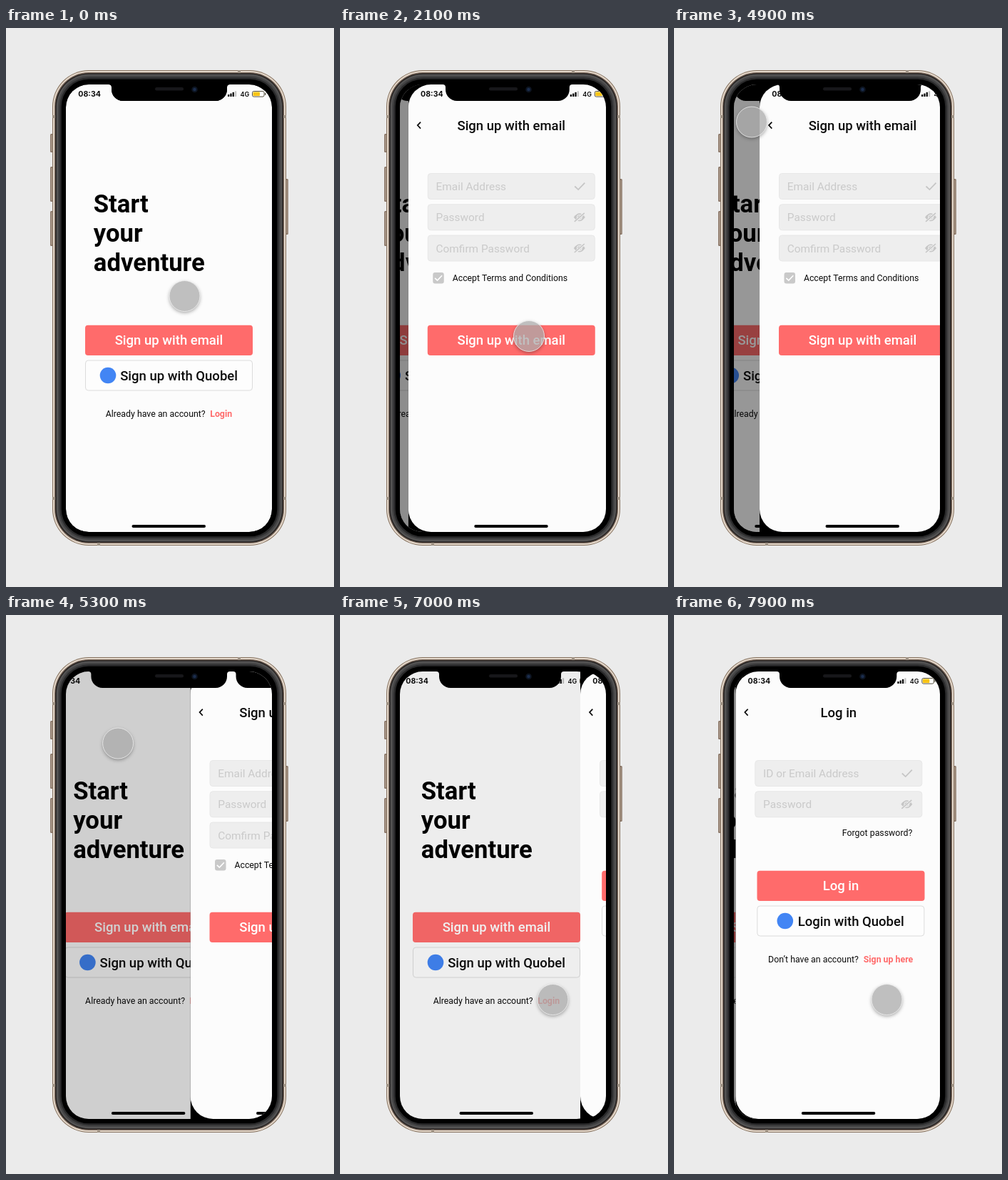
An HTML page with a canvas for the animation above (8 s loop, 460 px wide and 782 px high).

```html
<!DOCTYPE html>
<html lang="en">
<head>
<meta charset="utf-8">
<title>Sign-up flow</title>
<style>
  html, body { margin: 0; width: 100%; height: 100%; overflow: hidden; background: #ebebeb; }
  canvas { display: block; width: 460px; height: 782px; }
</style>
</head>
<body>
<canvas id="stage"></canvas>
<script>
const canvas = document.getElementById('stage');
const ctx = canvas.getContext('2d');
const ratio = window.devicePixelRatio || 1;
canvas.width = 460 * ratio;
canvas.height = 782 * ratio;

const LOOP = 8000, STEP = 100, SLIDE = 1310;
const SCREEN = { x: 84, y: 79, w: 289, h: 626, r: 32 };
const MID = SCREEN.x + SCREEN.w / 2;
const CORAL = '#ff6b6b', INK = '#0c0c0c', HINT = '#cacaca', PAPER = '#fcfcfc';

const clamp = v => Math.min(1, Math.max(0, v));
const progress = (t, start, length) => clamp((t - start) / length);
const easeInOut = u => u < 0.5 ? 2 * u * u : 1 - 2 * (1 - u) ** 2;
const easeOut = u => 1 - (1 - u) ** 2;

function box(x, y, w, h, r, fill, stroke) {
  ctx.beginPath();
  ctx.roundRect(x, y, w, h, r);
  if (fill) { ctx.fillStyle = fill; ctx.fill(); }
  if (stroke) { ctx.strokeStyle = stroke; ctx.lineWidth = 1; ctx.stroke(); }
}

function disc(x, y, r, fill) {
  ctx.beginPath();
  ctx.arc(x, y, r, 0, Math.PI * 2);
  ctx.fillStyle = fill;
  ctx.fill();
}

function line(color, width, ...points) {
  ctx.beginPath();
  points.forEach(([x, y]) => ctx.lineTo(x, y));
  ctx.strokeStyle = color;
  ctx.lineWidth = width;
  ctx.stroke();
}

function text(str, x, y, size, { weight = 400, color = INK, align = 'left', family = 'Roboto' } = {}) {
  ctx.font = `${weight} ${size}px ${family}, sans-serif`;
  ctx.textAlign = align;
  ctx.fillStyle = color;
  ctx.fillText(str, x, y);
}

// Interface parts

function title(str) {
  line(INK, 1.7, [101.3, 131.6], [97, 136.1], [101.3, 140.6]);
  text(str, MID, 143, 18.5, { weight: 500, align: 'center' });
}

function primaryButton(str, x, y) {
  box(x, y, 235, 42.3, 4, CORAL);
  text(str, x + 117.5, y + 27.3, 18.5, { weight: 500, color: '#fff', align: 'center' });
}

function partnerButton(str, x, y, iconX, textX) {
  box(x + 0.5, y + 0.5, 234, 42, 4, '#fdfdfd', '#dcdcdc');
  disc(iconX, y + 21.5, 11.3, '#4285f4');
  text(str, textX, y + 28, 18.5, { weight: 500 });
}

function tick(x, y, size, color, width) {
  line(color, width, [x - size, y], [x - size * 0.3, y + size * 0.65], [x + size, y - size * 0.7]);
}

function hiddenEye(x, y) {
  ctx.beginPath();
  ctx.moveTo(x - 8, y);
  ctx.quadraticCurveTo(x, y - 11, x + 8, y);
  ctx.quadraticCurveTo(x, y + 11, x - 8, y);
  ctx.fillStyle = '#c6c6c6';
  ctx.fill();
  ctx.beginPath();
  ctx.arc(x, y, 3.3, 0, Math.PI * 2);
  ctx.strokeStyle = '#eee';
  ctx.lineWidth = 1.2;
  ctx.stroke();
  line('#eee', 3.6, [x - 6, y + 6], [x + 7, y - 6]);
  line('#c6c6c6', 1.6, [x - 7, y + 6], [x + 7, y - 6]);
}

function field(hint, y, secret) {
  box(111.5, y + 0.5, 234, 36, 4, '#eee', '#e7e7e7');
  text(hint, 122.8, y + 24, 15.4, { color: HINT });
  if (secret) hiddenEye(324, y + 18.5);
  else tick(324.5, y + 18.5, 7, '#c6c6c6', 1.8);
}

function prompt(question, x, action, actionX, y) {
  text(question, x, y, 12.35);
  text(action, actionX, y, 12.35, { weight: 700, color: CORAL });
}

function statusBar() {
  text('08:34', 101.3, 95.6, 10.6, { weight: 700, family: 'Inter' });
  for (let i = 0; i < 4; i++) {
    const h = 3 + i * 1.6;
    box(311 + i * 3.3, 96 - h, 2.3, h, 0.6, i < 3 ? INK : '#c4c4c4');
  }
  text('4G', 328.4, 96.3, 9, { weight: 600, family: 'Inter' });
  box(345.5, 88.5, 16.5, 7.6, 2, '#fff', '#55503f');
  box(346.5, 89.5, 9.5, 5.6, 1, '#fac515');
  box(363, 90.8, 1.3, 3, 0.6, '#55503f');
}

function notch() {
  ctx.beginPath();
  ctx.moveTo(144, 78);
  ctx.lineTo(144, 79);
  ctx.arcTo(148, 79, 148, 83, 4);
  ctx.arcTo(148, 102, 165, 102, 16);
  ctx.arcTo(310, 102, 310, 85, 16);
  ctx.arcTo(310, 79, 314, 79, 4);
  ctx.lineTo(314, 78);
  ctx.fillStyle = '#000';
  ctx.fill();
}

// Pages

function homePage() {
  ['Start', 'your', 'adventure'].forEach((word, i) =>
    text(word, 122.8, 258 + i * 40.9, 34.7, { weight: 700, color: '#000' }));
  primaryButton('Sign up with email', 111, 415.7);
  partnerButton('Sign up with Quobel', 111, 464.5, 143, 160.2);
  prompt('Already have an account?', 139.7, 'Login', 286.2, 544);
}

function signUpPage() {
  title('Sign up with email');
  field('Email Address', 203);
  field('Password', 246.3, true);
  field('Comfirm Password', 289.5, true);
  box(118.5, 342, 15.5, 15.5, 3, '#c9c9c9');
  tick(126.3, 349.8, 5, '#fff', 1.6);
  text('Accept Terms and Conditions', 145.9, 354, 12.3);
  primaryButton('Sign up with email', 111, 415.7);
}

function loginPage() {
  title('Log in');
  field('ID or Email Address', 203);
  field('Password', 246.3, true);
  text('Forgot password?', 233.5, 309, 12.35);
  primaryButton('Log in', 114.2, 357.7);
  partnerButton('Login with Quobel', 114, 406.5, 153.5, 171.5);
  prompt('Don’t have an account?', 129.8, 'Sign up here', 263.4, 486);
}

function drawPage(page, shift) {
  const { x, y, w, h, r } = SCREEN;
  ctx.save();
  ctx.translate(shift, 0);
  ctx.beginPath();
  ctx.rect(x, y, w, h);
  ctx.clip();
  box(x, y, w, h, 0, '#000');
  box(x, y, w, h, r, PAPER);
  statusBar();
  notch();
  page();
  box(176.5, 695, 103.5, 4, 2, '#000');
  ctx.restore();
}

// Device

function drawPhone() {
  const metal = '#8a7667', sheen = '#ac9b8c';
  [[148, 26], [194, 49], [256, 49]].forEach(([y, h]) => {
    box(62, y, 5, h, 1.5, metal);
    box(63.2, y + 1.5, 1.6, h - 3, 0.8, sheen);
  });
  box(391, 211, 4.8, 78, 1.5, metal);
  box(393.2, 212.5, 1.3, 75, 0.6, sheen);

  const rings = [
    [0, '#86725f'], [1, '#e4d8cb'], [3, '#7d6a5d'], [4.2, '#262322'],
    [5.8, '#545353'], [8, '#424243'], [10.3, '#2a2a2b'], [12.7, '#000']
  ];
  rings.forEach(([d, color]) => box(65 + d, 59 + d, 328 - 2 * d, 665 - 2 * d, 51 - d, color));

  ctx.fillStyle = '#a09385';
  [124, 658].forEach(y => {
    ctx.fillRect(65, y - 2, 4, 4);
    ctx.fillRect(389, y - 2, 4, 4);
  });
  ctx.fillRect(325, 59, 4, 4);
  ctx.fillRect(128, 720, 4, 4);
}

function drawNotchParts() {
  notch();
  box(209, 83, 40, 4.5, 2.2, '#17171a');
  disc(264.5, 86, 4.3, '#0d1420');
  disc(264.5, 86, 2.3, '#1b2d4d');
}

// Touch pointer

function alongArc(u, [x0, y0], [cx, cy], [x1, y1]) {
  const a = (1 - u) ** 2, b = 2 * u * (1 - u), c = u * u;
  return [a * x0 + b * cx + c * x1, a * y0 + b * cy + c * y1];
}

function touchAt(t) {
  const button = [265, 431], back = [109, 131.5], login = [298.5, 538];
  if (t < 2300) return alongArc(easeOut(progress(t, 0, 900)), [250.5, 375], [260, 402], button);
  if (t < 4500) return alongArc(easeInOut(progress(t, 2350, 1350)), button, [263, 175], back);
  return alongArc(easeInOut(progress(t, 4950, 1450)), back, [330, 338], login);
}

function drawTouch(x, y) {
  const radius = 21.5;
  // The shadow falls only outside the disc, so the disc stays evenly tinted.
  ctx.save();
  ctx.beginPath();
  ctx.rect(0, 0, 460, 782);
  ctx.arc(x, y, radius, 0, Math.PI * 2);
  ctx.clip('evenodd');
  ctx.shadowColor = 'rgba(0,0,0,.34)';
  ctx.shadowBlur = 5 * ratio;
  ctx.shadowOffsetY = 2 * ratio;
  disc(x, y, radius, '#bbb');
  ctx.restore();

  disc(x, y, radius, 'rgba(171,171,171,.74)');
  ctx.beginPath();
  ctx.arc(x, y, radius, 0, Math.PI * 2);
  ctx.strokeStyle = 'rgba(245,245,245,.75)';
  ctx.lineWidth = 1;
  ctx.stroke();
}

function render(t) {
  const slide = start => easeInOut(progress(t, start, SLIDE));
  const onLogin = t > 6500;
  const cover = onLogin ? slide(6673) : slide(977) - slide(4573);

  ctx.setTransform(ratio, 0, 0, ratio, 0, 0);
  ctx.fillStyle = '#ebebeb';
  ctx.fillRect(0, 0, 460, 782);
  drawPhone();

  const { x, y, w, h, r } = SCREEN;
  ctx.save();
  ctx.beginPath();
  ctx.roundRect(x, y, w, h, r);
  ctx.clip();
  drawPage(homePage, -w * cover / 4);
  ctx.fillStyle = `rgba(0,0,0,${cover * 0.46})`;
  ctx.fillRect(x, y, w, h);
  if (cover > 0) drawPage(onLogin ? loginPage : signUpPage, w * (1 - cover));
  ctx.restore();

  drawNotchParts();
  drawTouch(...touchAt(t));
}

// The motion advances at ten pictures a second.
function tickClock() {
  const t = performance.now() + 8;
  render(Math.floor((t % LOOP) / STEP) * STEP);
  requestAnimationFrame(tickClock);
}
tickClock();
</script>
</body>
</html>
```
